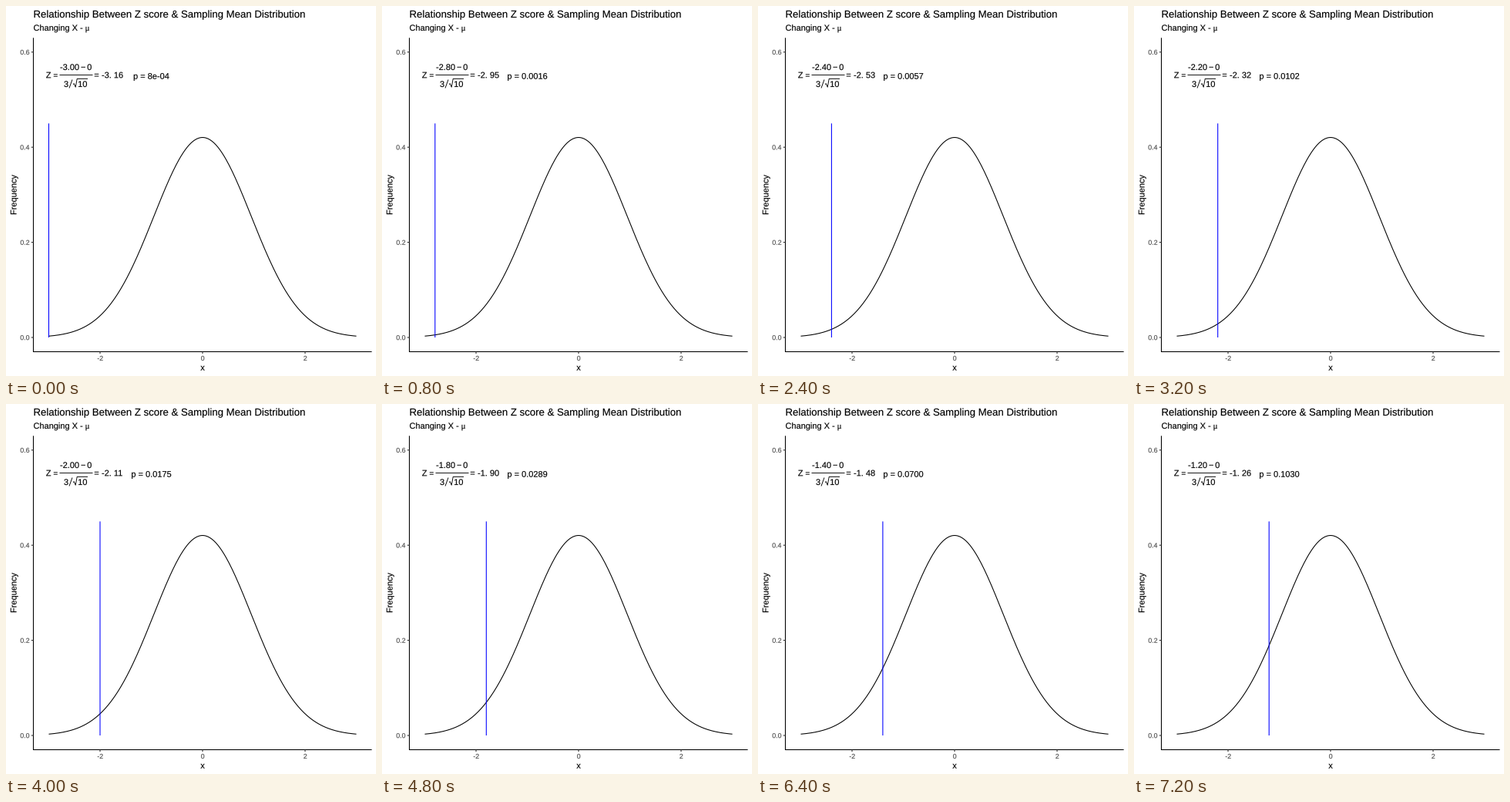
These frames come from a looping animation (480x480 px, 8 s). A matplotlib script:

```python
import math

import matplotlib.pyplot as plt
import numpy as np
from matplotlib.animation import FuncAnimation
from matplotlib.patches import PathPatch
from matplotlib.textpath import TextPath
from matplotlib.transforms import Affine2D

SIZE = 480
FRAMES = 10
INTERVAL = 800
SE = 3 / math.sqrt(10)

fig = plt.figure(figsize=(SIZE / 72, SIZE / 72), dpi=72, facecolor="white")
ax = fig.add_axes([0, 0, 1, 1])
ax.set_xlim(0, SIZE)
ax.set_ylim(SIZE, 0)
ax.axis("off")


def px(x):
    return 255 + 66.5 * x


def py(y):
    return 430 - 617 * y


def line(xs, ys, color="black", lw=1.07):
    return ax.plot(xs, ys, color=color, lw=lw, solid_capstyle="butt",
                   snap=False)[0]


def text_path(x, y, s, size=11, align=0, angle=0, family="Liberation Sans"):
    """Outline of s with its baseline at y; align 0, 0.5, 1 = left, centre, right."""
    path = TextPath((0, 0), s, size=size, prop={"family": family})
    shift = -align * path.get_extents().x1
    move = Affine2D().translate(shift, 0).scale(1, -1).rotate_deg(-angle)
    return move.translate(x, y).transform_path(path)


def label(*args, color="black", **kw):
    patch = PathPatch(text_path(*args, **kw), facecolor=color, edgecolor=color,
                      lw=0.15, snap=False)
    return ax.add_patch(patch)


# Titles
label(35.5, 15, "Relationship Between Z score & Sampling Mean Distribution", 13.2)
label(35.5, 32, "Changing X - ")
label(102.6, 32, "\u03bc", family="Liberation Serif")
label(255, 472.7, "x", align=0.5)
label(13.5, 245, "Frequency", align=0.5, angle=90)

# Axes
line([35.5, 35.5], [41.3, 449])
line([35, 474.5], [448.5, 448.5])
for v in (0, 0.2, 0.4, 0.6):
    line([32.75, 35.5], [py(v)] * 2, "#333333")
    label(30.2, py(v) + 3.2, f"{v:.1f}", 8.8, 1, color="#4d4d4d")
for v in (-2, 0, 2):
    line([px(v)] * 2, [448.5, 451.25], "#333333")
    label(px(v), 460, str(v), 8.8, 0.5, color="#4d4d4d")

# Sampling distribution of the mean
xs = np.linspace(-3, 3, 301)
density = np.exp(-0.5 * (xs / SE) ** 2) / (SE * math.sqrt(2 * math.pi))
line(px(xs), py(density))

# Fixed parts of the formula
label(51.8, 93.3, "Z")
label(61.4, 93.3, "=", 10)
label(97, 83, "\u2212")
label(105.2, 83, "0")
line([69.5, 112.5], [89.5, 89.5], lw=0.9)
label(75, 105, "3")
line([82, 86], [106.5, 95.5], lw=0.9)
line([87, 88.3, 90.2, 92.2, 106], [101.5, 100.7, 105.3, 94.5, 94.5], lw=0.9)
label(93.2, 105, "10")
label(114.3, 93.3, "=")

# Moving parts: place and alignment of each text
MEAN = dict(x=70, y=83)
Z = dict(x=124, y=93.3)
P = dict(x=188.3, y=94.7, align=0.5)
marker = line([0, 0], [py(0.45), py(0)], "blue")
mean_text = label(s="0", **MEAN)
z_text = label(s="0", **Z)
p_text = label(s="0", **P)


def update(i):
    mean = -3 + 0.2 * i
    z = mean / SE
    p = 0.5 * math.erfc(-z / math.sqrt(2))
    whole, decimals = f"{z:.2f}".split(".")
    p_value = f"{p:.0e}" if p < 0.001 else f"{p:.4f}"
    marker.set_xdata([px(mean)] * 2)
    mean_text.set_path(text_path(s=f"{mean:.2f}", **MEAN))
    z_text.set_path(text_path(s=f"{whole}. {decimals}", **Z))
    p_text.set_path(text_path(s=f"p = {p_value}", **P))
    return marker, mean_text, z_text, p_text


anim = FuncAnimation(fig, update, frames=FRAMES, interval=INTERVAL,
                     repeat=True, repeat_delay=0)
plt.show()
```
